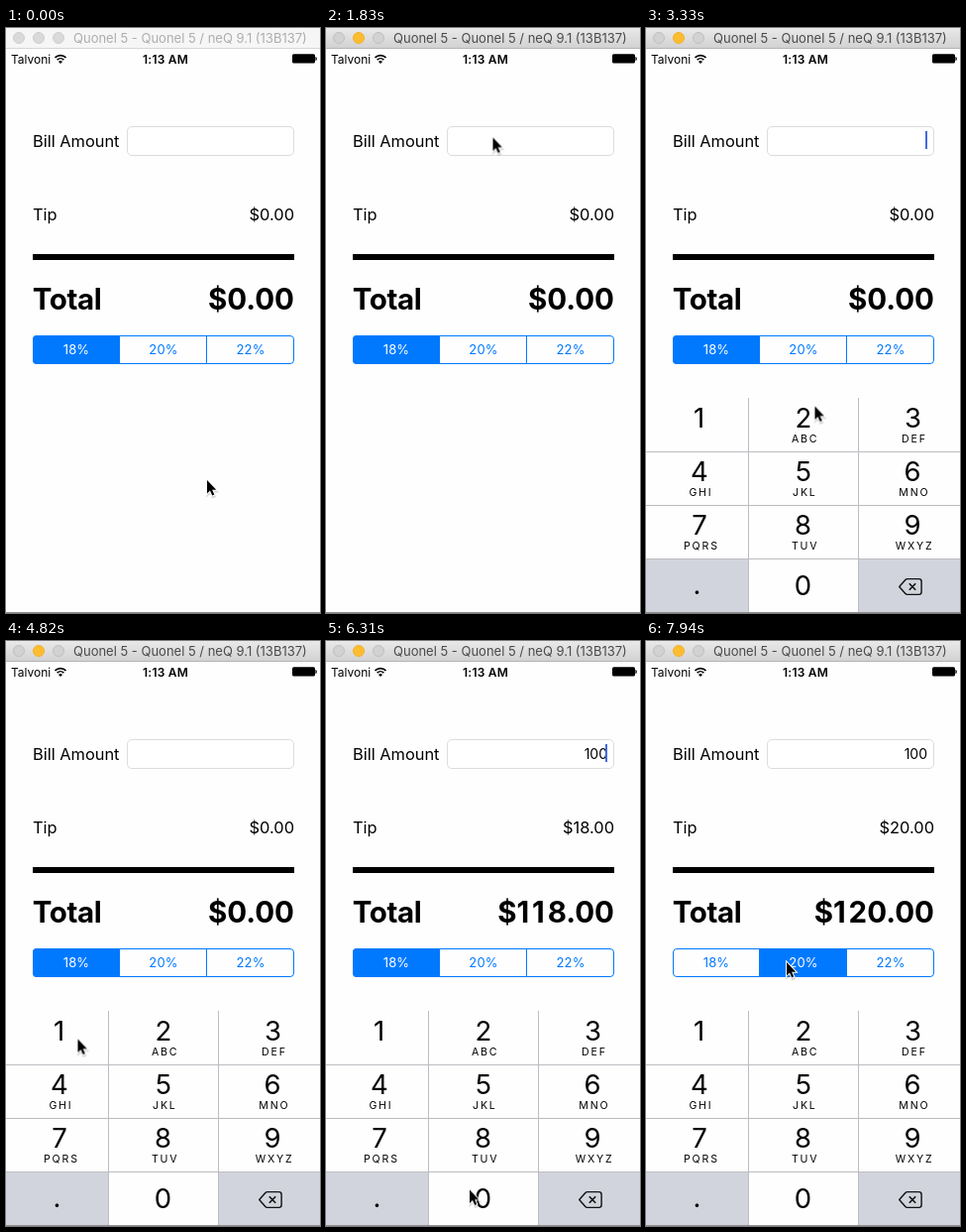
An HTML page for the animation above (8 s loop, 317 px wide and 590 px high).

```html
<!DOCTYPE html>
<html lang="en">
<head>
<meta charset="utf-8">
<title>Tip calculator</title>
<style>
html, body { margin: 0; width: 100%; height: 100%; overflow: hidden; background: #fefefe; }
svg { display: block; width: 100%; height: 100%; font-family: Inter, "Noto Sans", sans-serif; }

.label { font-size: 16.4px; }
.total { font-size: 29.5px; font-weight: 700; }
.total tspan { letter-spacing: 2.8px; }
.end { text-anchor: end; }
.mid { text-anchor: middle; }
.seg { font-size: 13px; letter-spacing: .2px; text-anchor: middle; fill: #0079ff; }
.seg .on { fill: #fff; }
.digits { font-size: 27.5px; text-anchor: middle; }
.letters { font-size: 10.6px; letter-spacing: 1.8px; text-anchor: middle; }

/* One clock for everything: hard steps on an 8 s loop */
.t { animation: 8s step-end -16ms infinite; }

.inactive { animation-name: inactive; }
.active { animation-name: active; opacity: 0; }
@keyframes inactive { 0% { opacity: 1 } 22.875% { opacity: 0 } }
@keyframes active { 0% { opacity: 0 } 22.875% { opacity: 1 } }

.bill0 { animation-name: bill0; }
.bill1 { animation-name: bill1; opacity: 0; }
.bill10 { animation-name: bill10; opacity: 0; }
.bill100 { animation-name: bill100; opacity: 0; }
.tip18 { animation-name: tip18; opacity: 0; }
.tip20 { animation-name: tip20; opacity: 0; }
.seg18 { animation-name: seg18; }
@keyframes bill0 { 0% { opacity: 1 } 62.125% { opacity: 0 } }
@keyframes bill1 { 0% { opacity: 0 } 62.125% { opacity: 1 } 75.125% { opacity: 0 } }
@keyframes bill10 { 0% { opacity: 0 } 75.125% { opacity: 1 } 78.875% { opacity: 0 } }
@keyframes bill100 { 0% { opacity: 0 } 78.875% { opacity: 1 } }
@keyframes tip18 { 0% { opacity: 0 } 78.875% { opacity: 1 } 97.5% { opacity: 0 } }
@keyframes tip20 { 0% { opacity: 0 } 97.5% { opacity: 1 } }
@keyframes seg18 { 0% { opacity: 1 } 97.5% { opacity: 0 } }

.press1 { animation-name: press1; opacity: 0; }
.press0 { animation-name: press0; opacity: 0; }
@keyframes press1 { 0% { opacity: 0 } 62.125% { opacity: 1 } 64% { opacity: 0 } }
@keyframes press0 { 0% { opacity: 0 } 75.125% { opacity: 1 } 78.875% { opacity: 0 } }

.caret { animation-name: caret; opacity: 0; }
@keyframes caret {
  0% { opacity: 0 }
  24.75% { opacity: 1 } 34.125% { opacity: 0 }
  39.75% { opacity: 1 } 45.375% { opacity: 0 }
  50.875% { opacity: 1 } 56.5% { opacity: 0 }
  62.125% { opacity: 1 } 67.75% { opacity: 0 }
  71.375% { opacity: 1 } 86.375% { opacity: 0 }
  92% { opacity: 1 } 97.5% { opacity: 0 }
}

.keyboard { animation-name: slide; transform: translateY(217px); }
@keyframes slide {
  0% { transform: translateY(217px) }
  26.625% { transform: translateY(92px) }
  28.5% { transform: translateY(10.5px) }
  30.375% { transform: none }
}

.pointer { animation-name: point; }
@keyframes point {
  0% { transform: translate(203px, 456px) }
  6.25% { transform: translate(201px, 438px) }
  8.125% { transform: translate(190px, 370px) }
  10% { transform: translate(175px, 280px) }
  11.875% { transform: translate(162px, 200px) }
  13.75% { transform: translate(155px, 138px) }
  15.625% { transform: translate(158px, 99px) }
  17.5% { transform: translate(165px, 105px) }
  19.25% { transform: translate(168.5px, 110.5px) }
  36% { transform: translate(232px, 45px) }
  37.875% { transform: translate(289px, 9px) }
  39.75% { transform: translate(245px, 215px) }
  41.625% { transform: translate(170.5px, 381.5px) }
  43.5% { transform: translate(161px, 411px) }
  45.375% { transform: translate(158px, 414px) }
  47.125% { transform: translate(158px, 413px) }
  56.5% { transform: translate(138px, 412px) }
  58.375% { transform: translate(94px, 406px) }
  60.25% { transform: translate(72.5px, 401.5px) }
  65.875% { transform: translate(88px, 470px) }
  67.75% { transform: translate(122px, 562px) }
  69.5% { transform: translate(141px, 561px) }
  71.375% { transform: translate(145px, 553.5px) }
  84.5% { transform: translate(146px, 538px) }
  86.375% { transform: translate(141px, 488px) }
  88.25% { transform: translate(135px, 410px) }
  90.125% { transform: translate(133px, 350px) }
  92% { transform: translate(138px, 328px) }
  93.75% { transform: translate(142px, 324px) }
}
</style>
</head>
<body>
<svg viewBox="0 0 317 590" preserveAspectRatio="none">
  <defs>
    <linearGradient id="chrome" x2="0" y2="1">
      <stop stop-color="#e9e9e9"/><stop offset="1" stop-color="#d2d2d2"/>
    </linearGradient>
    <clipPath id="pill"><rect x="27" y="310" width="264" height="29" rx="4"/></clipPath>
    <path id="arrow" d="M0 0V13.4l3-2.8 2.2 4.9 2.1-.9-2.2-4.8h4.2z"/>
  </defs>
  <rect width="317" height="590" fill="#fefefe"/>

  <!-- window bar -->
  <g font-size="13">
    <g class="t inactive">
      <rect width="317" height="20" fill="#f6f6f6"/>
      <rect y="20" width="317" height="1" fill="#d6d6d6"/>
      <g fill="#dadada" stroke="#cecece">
        <circle cx="13" cy="10" r="5.5"/><circle cx="33" cy="10" r="5.5"/><circle cx="53" cy="10" r="5.5"/>
      </g>
      <text x="68" y="15" fill="#adadad">Quonel 5 - Quonel 5 / neQ 9.1 (13B137)</text>
    </g>
    <g class="t active">
      <rect width="317" height="20" fill="url(#chrome)"/>
      <rect y="20" width="317" height="1" fill="#b4b4b4"/>
      <g fill="#d2d2d2" stroke="#bfbfbf">
        <circle cx="13" cy="10" r="5.5"/><circle cx="53" cy="10" r="5.5"/>
        <circle cx="33" cy="10" r="5.5" fill="#fdbd2e" stroke="#f0b02c"/>
      </g>
      <text x="68" y="15" fill="#4a4a4a">Quonel 5 - Quonel 5 / neQ 9.1 (13B137)</text>
    </g>
  </g>

  <!-- status bar -->
  <text x="5" y="35.5" font-size="12">Talvoni</text>
  <g fill="none" stroke="#000" stroke-width="1.7">
    <path d="M49.5 29.8a7.8 7.8 0 0 1 11 0M51.7 32.1a4.7 4.7 0 0 1 6.6 0"/>
  </g>
  <path d="M55 36l-2-2.1a2.9 2.9 0 0 1 4 0z"/>
  <text class="mid" x="161" y="35.5" font-size="12" font-weight="600" letter-spacing=".2">1:13 AM</text>
  <rect x="289" y="26.2" width="23" height="9.4" rx="1.5"/>
  <path d="M312.8 29.3q1.5 1.7 0 3.5z" stroke="#000" stroke-width=".6"/>

  <!-- form -->
  <text class="label" x="27" y="119.7">Bill Amount</text>
  <rect x="122.5" y="99.5" width="168" height="29" rx="4.5" fill="#fff" stroke="#dcdcdc"/>
  <text class="label" x="27" y="193.7">Tip</text>
  <rect x="27" y="228" width="264" height="6"/>
  <text class="total" x="26.8" y="284" letter-spacing="-.4">Total</text>

  <g class="end" font-size="14">
    <text class="t bill1" x="284" y="119">1</text>
    <text class="t bill10" x="284" y="119">10</text>
    <text class="t bill100" x="284" y="119">100</text>
  </g>
  <rect class="t caret" x="282" y="104" width="2" height="18" fill="#4668e0"/>

  <g class="end">
    <g class="t bill0"><text class="label" x="291" y="193.7">$0.00</text><text class="total" x="291" y="284">$0.00</text></g>
    <g class="t bill1"><text class="label" x="291" y="193.7">$0.18</text><text class="total" x="291" y="284">$<tspan>1</tspan>.18</text></g>
    <g class="t bill10"><text class="label" x="291" y="193.7">$1.80</text><text class="total" x="291" y="284">$<tspan>11</tspan>.80</text></g>
    <g class="t tip18"><text class="label" x="291" y="193.7">$18.00</text><text class="total" x="291" y="284">$<tspan>11</tspan>8.00</text></g>
    <g class="t tip20"><text class="label" x="291" y="193.7">$20.00</text><text class="total" x="291" y="284">$<tspan>1</tspan>20.00</text></g>
  </g>

  <!-- tip rate -->
  <g class="seg">
    <g clip-path="url(#pill)">
      <rect class="t seg18" x="27" y="310" width="88" height="29"/>
      <rect class="t tip20" x="114" y="310" width="89" height="29"/>
    </g>
    <rect x="27.5" y="310.5" width="263" height="28" rx="3.5" fill="none" stroke="#0079ff"/>
    <path d="M114.5 310v29M202.5 310v29" stroke="#0079ff"/>
    <text x="71" y="329">18%</text><text x="159" y="329">20%</text><text x="247" y="329">22%</text>
    <text class="t seg18 on" x="71" y="329">18%</text>
    <text class="t tip20 on" x="159" y="329">20%</text>
  </g>

  <!-- number pad -->
  <g class="t keyboard">
    <rect y="373" width="317" height="217" fill="#fefefe"/>
    <path d="M0 535h103v55H0zM215 535h102v55H215z" fill="#d1d4dc"/>
    <rect class="t press1" y="373" width="103" height="54" fill="#d1d4dc"/>
    <rect class="t press0" x="104" y="536" width="110" height="54" fill="#d1d4dc"/>
    <path d="M103.5 373v217M214.5 373v217M0 427.5h317M0 481.5h317M0 535.5h317" stroke="#bcbdc1"/>
    <g class="digits">
      <text x="53.7" y="403">1</text><text x="159" y="403">2</text><text x="269.5" y="403">3</text>
      <text x="54" y="457">4</text><text x="159" y="457">5</text><text x="269" y="457">6</text>
      <text x="54" y="511">7</text><text x="158.5" y="511">8</text><text x="269" y="511">9</text>
      <text x="51.5" y="570.5">.</text><text x="158.5" y="572">0</text>
    </g>
    <g class="letters">
      <text x="160.6" y="418">ABC</text><text x="270.9" y="418">DEF</text>
      <text x="55.4" y="472">GHI</text><text x="160.4" y="472">JKL</text><text x="270.9" y="472">MNO</text>
      <text x="55.9" y="526">PQRS</text><text x="160.6" y="526">TUV</text><text x="271.1" y="526">WXYZ</text>
    </g>
    <g fill="none" stroke="#111" stroke-width="1.4" stroke-linejoin="round">
      <path d="M255.7 563.5l6.2-7q.8-.9 2-.9h11.6q2.6 0 2.6 2.6v10.6q0 2.6-2.6 2.6h-11.6q-1.2 0-2-.9z"/>
      <path d="M265.8 560.3l6.4 6.4M272.2 560.3l-6.4 6.4" stroke-width="1.6"/>
    </g>
  </g>
  <rect y="589" width="317" height="1" fill="#8e8e8e"/>

  <g class="t pointer">
    <use href="#arrow" transform="translate(.4 1.8)" opacity=".16" stroke="#000" stroke-width="2"/>
    <use href="#arrow" stroke="#fff" stroke-width="2" paint-order="stroke"/>
  </g>
</svg>
</body>
</html>
```
